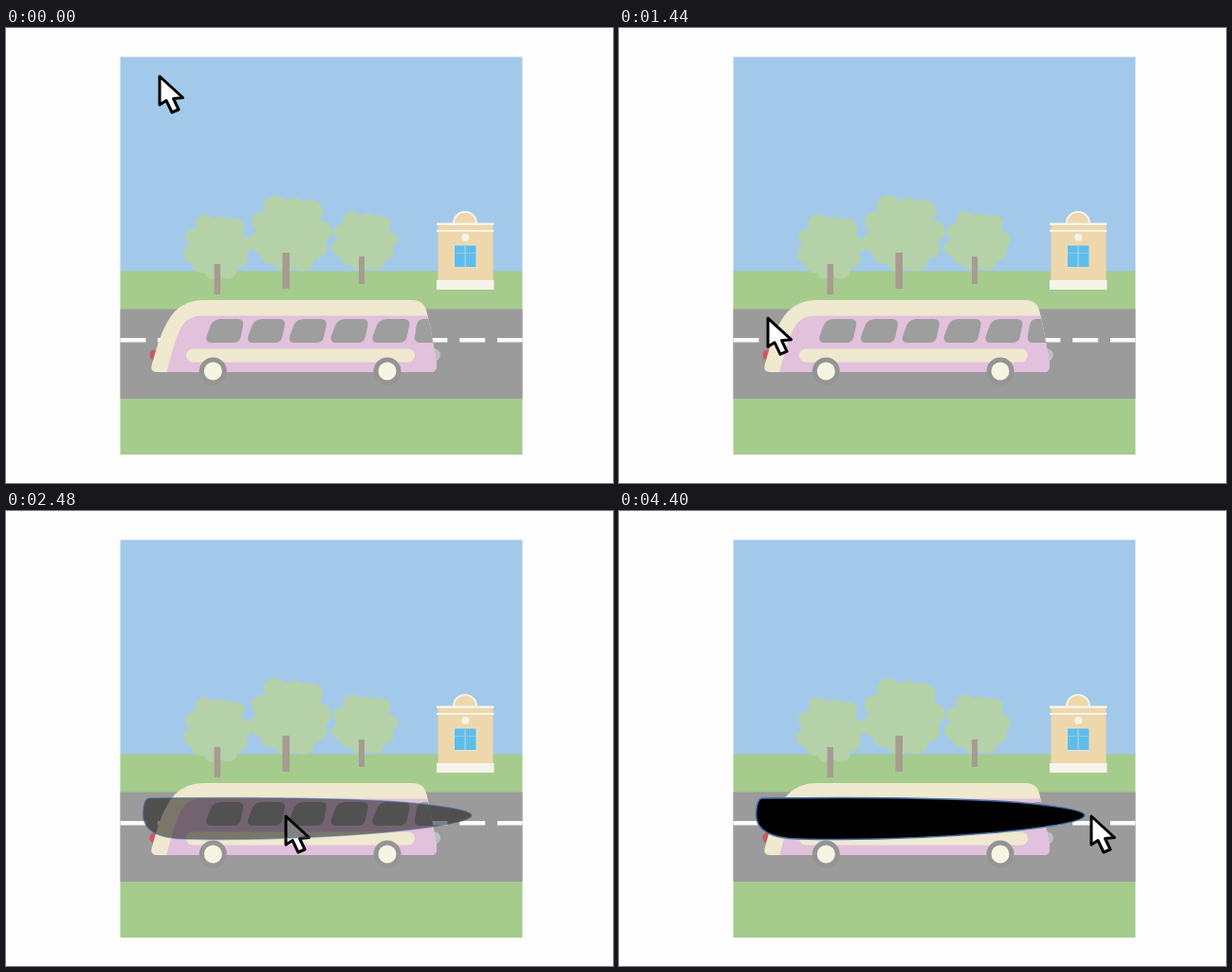
An HTML page with a canvas that plays this animation: 640x480 px, repeating every 4480 ms.

```html
<!DOCTYPE html>
<html lang="en">
<head>
<meta charset="utf-8">
<title>Bus and marker</title>
<style>
  html, body { margin: 0; width: 100%; height: 100%; overflow: hidden; background: #fdfdfd; }
  canvas { display: block; width: 640px; height: 480px; }
</style>
</head>
<body>
<canvas id="stage" width="640" height="480"></canvas>
<script>
const ctx = document.getElementById('stage').getContext('2d');
const LOOP = 4480, STEP = 80;
const CREAM = '#efe9cf', PINK = '#e1c1dc', GLASS = '#9e9e9e', WALL = '#eed7aa', TRIM = '#f6f4ea';

const clamp = v => Math.min(1, Math.max(0, v));
const progress = (t, from, to) => clamp((t - from) / (to - from));
const ease = u => (1 - Math.cos(Math.PI * u)) / 2;
const mix = (a, b, p) => a + (b - a) * p;

function rect(color, x, y, w, h) {
  ctx.fillStyle = color;
  ctx.fillRect(x, y, w, h);
}

function disc(color, x, y, rx, ry = rx) {
  ctx.fillStyle = color;
  ctx.beginPath();
  ctx.ellipse(x, y, rx, ry, 0, 0, Math.PI * 2);
  ctx.fill();
}

function shape(color, d) {
  ctx.fillStyle = color;
  ctx.fill(new Path2D(d));
}

function drawGround() {
  rect('#fdfdfd', 0, 0, 640, 480);
  rect('#a3c9ea', 120.5, 30.5, 424, 227);
  rect('#a5cb8d', 120.5, 256.5, 424, 193.5);
  rect('#9b9b9b', 120.5, 296.5, 424, 94.5);
  for (let i = 0; i < 11; i++) {
    const x = Math.max(120.5, 120 + i * 39.8);
    rect('#fbfbfb', x, 327, Math.min(27, 544.5 - x), 4.5);
  }
}

// Leaf bumps in units of the crown radius: x, y, size
const BUMPS = [
  [-.37, -.72, .28], [.1, -.64, .3], [.48, -.58, .3], [.71, -.06, .29],
  [.58, .36, .3], [.3, .7, .28], [-.12, .72, .27], [-.45, .5, .3],
  [-.72, .22, .28], [-.66, -.3, .28]
];

function drawTree(x, y, rx, ry, trunkX, trunkY, trunkW, trunkH) {
  const leaf = '#b5d1a8';
  disc(leaf, x, y, rx * .8, ry * .82);
  for (const [bx, by, r] of BUMPS) disc(leaf, x + bx * rx, y + by * ry, r * rx, r * ry);
  rect('#a89b92', trunkX, trunkY, trunkW, trunkH);
}

function drawHouse() {
  disc(TRIM, 484, 206, 13);
  disc(WALL, 484, 206, 11);
  rect(WALL, 455.5, 206, 58, 62);
  rect(TRIM, 454, 205.5, 60.5, 2.5);
  rect(TRIM, 454, 213, 60.5, 2);
  disc(TRIM, 484.3, 221, 4);
  rect('#e3dfc4', 471.5, 228, 25.5, 25.5);
  rect('#5fbdeb', 473, 229.5, 22.5, 22.5);
  rect('#9bcfe3', 483.5, 229.5, 1.5, 22.5);
  rect('#8acbe8', 473, 237, 22.5, 1);
  rect(TRIM, 454, 266, 60.5, 10);
}

function drawBus() {
  disc('#c95a62', 156, 345, 4.5, 5.5);
  disc('#b9c0c6', 452, 345, 6, 6.5);
  const body = 'M159 363 Q152 363 153.500 356 C160 333 166 312 178 299 Q190 287 208 287 ' +
    'L428 287 Q441 287 443.500 299 C447 314 451 335 454 354 Q455 363 448 363 Z';
  shape(CREAM, body);
  ctx.save();
  ctx.clip(new Path2D(body));
  shape(PINK, 'M169 364 C174 345 178 330 184 317 Q191 303.500 207 303.500 L460 303.500 L460 364 Z');
  const pane = 'M227 307 L244 307 Q251.500 307 250 314 L247.500 326 Q246 332 239 332 ' +
    'L216 332 Q210 332 211.500 325 L216 313 Q219 307 227 307 Z';
  for (let i = 0; i < 5; i++) {
    ctx.save();
    ctx.translate(i * 43.8, 0);
    shape(GLASS, pane);
    ctx.restore();
  }
  shape(GLASS, 'M440 307 L460 307 L460 332 L437 332 Q430 332 431 325 L433 313 Q435 307 440 307 Z');
  ctx.restore();
  ctx.fillStyle = CREAM;
  ctx.beginPath();
  ctx.roundRect(190, 338.5, 241, 14, 7);
  ctx.fill();
  for (const x of [218.3, 402]) {
    disc('#949494', x, 362, 14.5);
    disc('#f6f5e4', x, 362, 9.5);
  }
}

const pointer = new Path2D('M1 1 L1 31 L8 26.500 L14 39 L21 36 L15.500 24.500 L25.500 23.500 Z');

function drawPointer(x, y) {
  ctx.save();
  ctx.translate(x, y);
  ctx.lineJoin = 'round';
  ctx.lineWidth = 3;
  ctx.fillStyle = '#fff';
  ctx.strokeStyle = '#000';
  ctx.fill(pointer);
  ctx.stroke(pointer);
  ctx.restore();
}

const blob = new Path2D('M151 303 C230 302 335 302.500 400 306 C450 309 491 315 491 321 ' +
  'C491 328 450 334 400 339 C330 345 250 347.500 190 346 C160 345.500 144.500 337 144.500 320 ' +
  'C145 311 146 303.500 151 303 Z');

function drawBlob(alpha) {
  ctx.save();
  ctx.globalAlpha = alpha;
  ctx.fillStyle = '#000';
  ctx.fill(blob);
  ctx.lineWidth = 1.5;
  ctx.strokeStyle = '#456fa8';
  ctx.stroke(blob);
  ctx.restore();
}

function draw(t) {
  drawGround();
  drawTree(223, 231, 36, 34.5, 219.5, 249, 6.5, 32);
  drawTree(300, 217, 43.5, 40.5, 291.5, 237, 7.5, 38);
  drawTree(378, 225, 35, 31.5, 372, 241, 6, 29);
  drawHouse();
  drawBus();

  const down = ease(progress(t, 308, 1648));
  const across = ease(progress(t, 1845, 3290));
  const x = mix(mix(161, 155.7, down), 497, across);
  drawPointer(x, mix(50, 321, down));
  drawBlob(progress(t, 1690, 3300));
}

const start = performance.now();
function tick() {
  const t = (performance.now() - start) % LOOP;
  draw(Math.floor(t / STEP) * STEP);
  requestAnimationFrame(tick);
}
tick();
</script>
</body>
</html>
```
